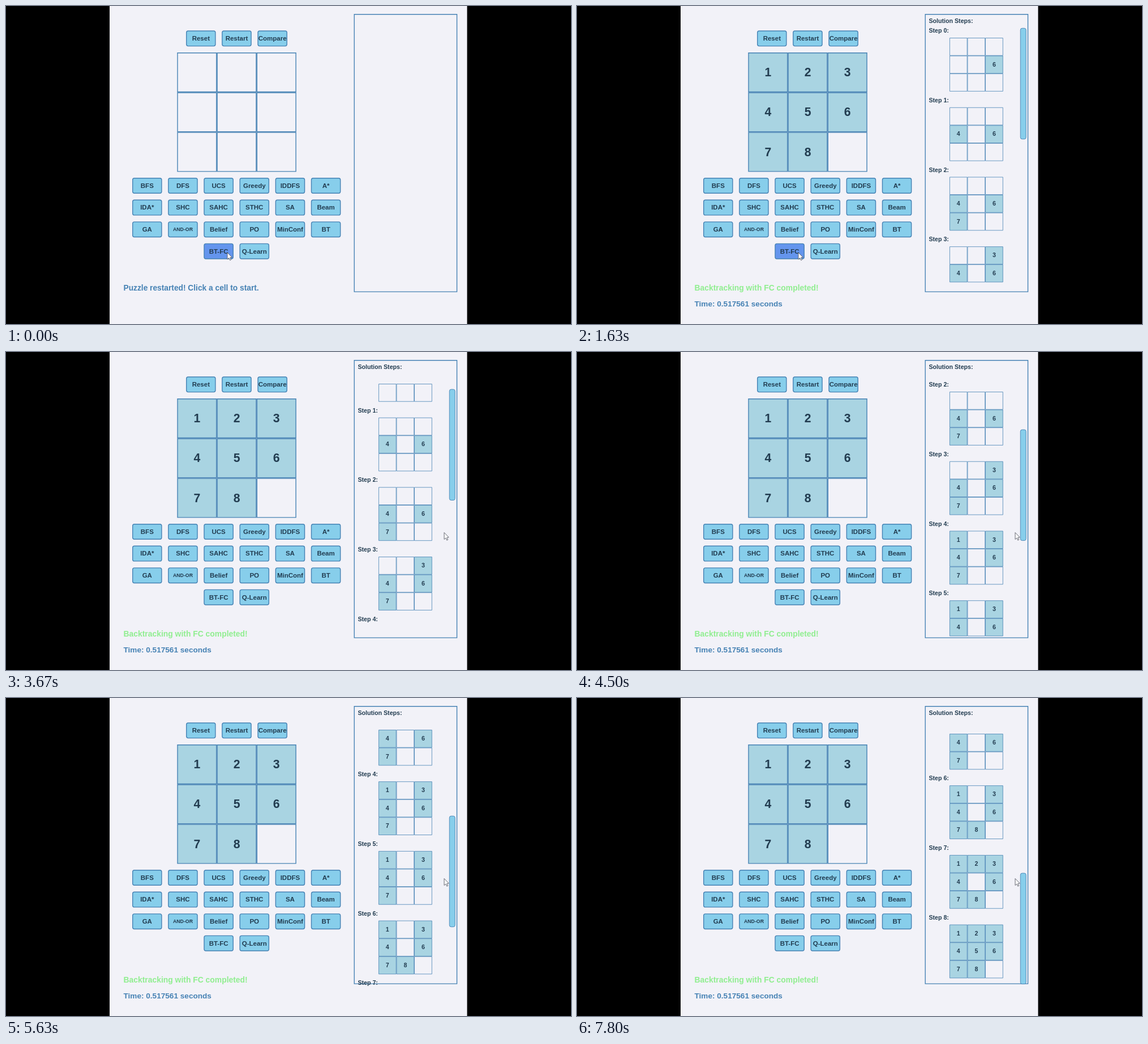
Animation, 998 px wide and 561 px high, one loop 7830 ms. Source, as an HTML page with a canvas:

```html
<!DOCTYPE html>
<html lang="en">
<head>
<meta charset="utf-8">
<title>Puzzle solver</title>
<style>
html, body { margin: 0; width: 998px; height: 561px; overflow: hidden; background: #000; }
canvas { display: block; }
</style>
</head>
<body>
<canvas id="stage" width="998" height="561"></canvas>
<script>
const ctx = document.getElementById('stage').getContext('2d');
const LOOP = 7830, SEARCH = 715, STEP = 57, DONE = SEARCH + 9 * STEP;
const UNIT = 0.70125;
const BG = '#f2f2f8', BLUE = '#4682b4', SKY = '#87ceeb', HOVER = '#6495ed',
      TILE = '#a9d4e2', INK = '#223c50', GREEN = '#90ee90';

// Cell indexes in the order the solver fills them; 8 stays blank.
const ORDER = [5, 3, 6, 2, 0, 8, 7, 1, 4];
const ROWS = [
  [318, 43.3, 'Reset Restart Compare'],
  [223, 303, 'BFS DFS UCS Greedy IDDFS A*'],
  [223, 341.6, 'IDA* SHC SAHC STHC SA Beam'],
  [223, 380.2, 'GA AND-OR Belief PO MinConf BT'],
  [349.3, 418.7, 'BT-FC Q-Learn']
];
const BUTTONS = ROWS.flatMap(([x, y, names]) =>
  names.split(' ').map((name, i) => ({ name, x: x + i * 63.15, y })));

// Keys: time, value...
const POINTER = [[0, 391, 435], [1650, 391, 435], [2500, 709, 322], [2650, 709, 322],
  [2950, 797, 326], [3250, 774, 318.5]];
const WHEEL = [[0, 0], [3350, 0], [4440, 11], [4560, 11], [5560, 19], [5680, 19],
  [6190, 26], [6260, 26], [6640, 31]];

const smooth = p => p * p * (3 - 2 * p);

function at(keys, t, ease = p => p) {
  const i = keys.findIndex(k => k[0] > t);
  if (i < 0) return keys[keys.length - 1].slice(1);
  const a = keys[i - 1], b = keys[i];
  const p = ease((t - a[0]) / (b[0] - a[0]));
  return a.slice(1).map((v, n) => v + (b[n + 1] - v) * p);
}

function text(str, x, y, size, color = INK, align = 'left') {
  ctx.font = `bold ${size}px "Liberation Sans", Arial, sans-serif`;
  ctx.textAlign = align;
  ctx.fillStyle = color;
  ctx.fillText(str, x, y + size * 0.36);
}

function box(x, y, w, h, line, fill, radius = 0) {
  ctx.beginPath();
  ctx.roundRect(x + line / 2, y + line / 2, w - line, h - line, radius);
  if (fill) {
    ctx.fillStyle = fill;
    ctx.fill();
  }
  ctx.lineWidth = line;
  ctx.strokeStyle = BLUE;
  ctx.stroke();
}

function board(x, y, size, line, font, count, visible = () => true) {
  const filled = ORDER.slice(0, count);
  for (let i = 0; i < 9; i++) {
    const cx = x + i % 3 * size, cy = y + Math.floor(i / 3) * size;
    if (!visible(cy)) continue;
    const on = i < 8 && filled.includes(i);
    box(cx, cy, size, size, line, on ? TILE : BG);
    if (on) text(i + 1, cx + size / 2, cy + size / 2 - 0.5, font, INK, 'center');
  }
}

function buttons(px, py) {
  for (const { name, x, y } of BUTTONS) {
    const over = px >= x && px <= x + 52.6 && py >= y && py <= y + 28;
    box(x, y, 52.6, 28, 1.4, over ? HOVER : SKY, 3);
    text(name, x + 26.3, y + 13.7, name === 'AND-OR' ? 8.75 : 11.5, INK, 'center');
  }
}

function panel(t) {
  box(614.5, 14, 182.7, 490.8, 1.4);
  if (t < DONE) return;
  const scroll = Math.min(Math.floor(at(WHEEL, t)[0]) * 30, 910) * UNIT;
  text('Solution Steps:', 621.5, 26, 10.65);
  for (let i = 0; i < 9; i++) {
    const y = 43.3 + i * 175 * UNIT - scroll;
    if (y > 41.5 && y < 510) text(`Step ${i}:`, 621.5, y, 10.6);
    board(658, y + 12.8, 31.55, 0.8, 10.6, i + 1, top => top >= 35 && top + 31.5 <= 504.5);
  }
  box(782.8, 38.8 + scroll * 0.4228, 10.8, 196.4, 0.9, SKY, 3);
}

function pointer(x, y) {
  ctx.beginPath();
  [[0, 0], [0, 12], [2.8, 9.5], [4.7, 13.6], [6.6, 12.7], [4.8, 8.8], [8.2, 8.5]]
    .forEach(([dx, dy]) => ctx.lineTo(x + dx, y + dy));
  ctx.closePath();
  ctx.fillStyle = '#fff';
  ctx.fill();
  ctx.lineWidth = 0.9;
  ctx.strokeStyle = '#555862';
  ctx.stroke();
}

function draw(t) {
  ctx.fillStyle = '#000';
  ctx.fillRect(0, 0, 998, 561);
  ctx.fillStyle = BG;
  ctx.fillRect(183, 0, 631.5, 561);

  const [px, py] = at(POINTER, t, smooth);
  const count = Math.max(0, Math.min(9, Math.floor((t - SEARCH) / STEP) + 1));
  board(302.3, 82.1, 70.15, 1.4, 21.2, count);

  if (t >= SEARCH && t < DONE) {
    text(`Backtracking+FC progress: ${count}/9 numbers placed`, 207.5, 496, 11.37, BLUE);
  } else {
    buttons(px, py);
    panel(t);
    if (t < SEARCH) {
      text('Puzzle restarted! Click a cell to start.', 207.5, 497.3, 13.75, BLUE);
    } else {
      text('Backtracking with FC completed!', 207.5, 497.3, 13.9, GREEN);
      text('Time: 0.517561 seconds', 207.5, 525.3, 13.6, BLUE);
    }
  }
  pointer(px, py);
}

const start = performance.now();
function tick() {
  draw((performance.now() - start) % LOOP);
  requestAnimationFrame(tick);
}
tick();
</script>
</body>
</html>
```
